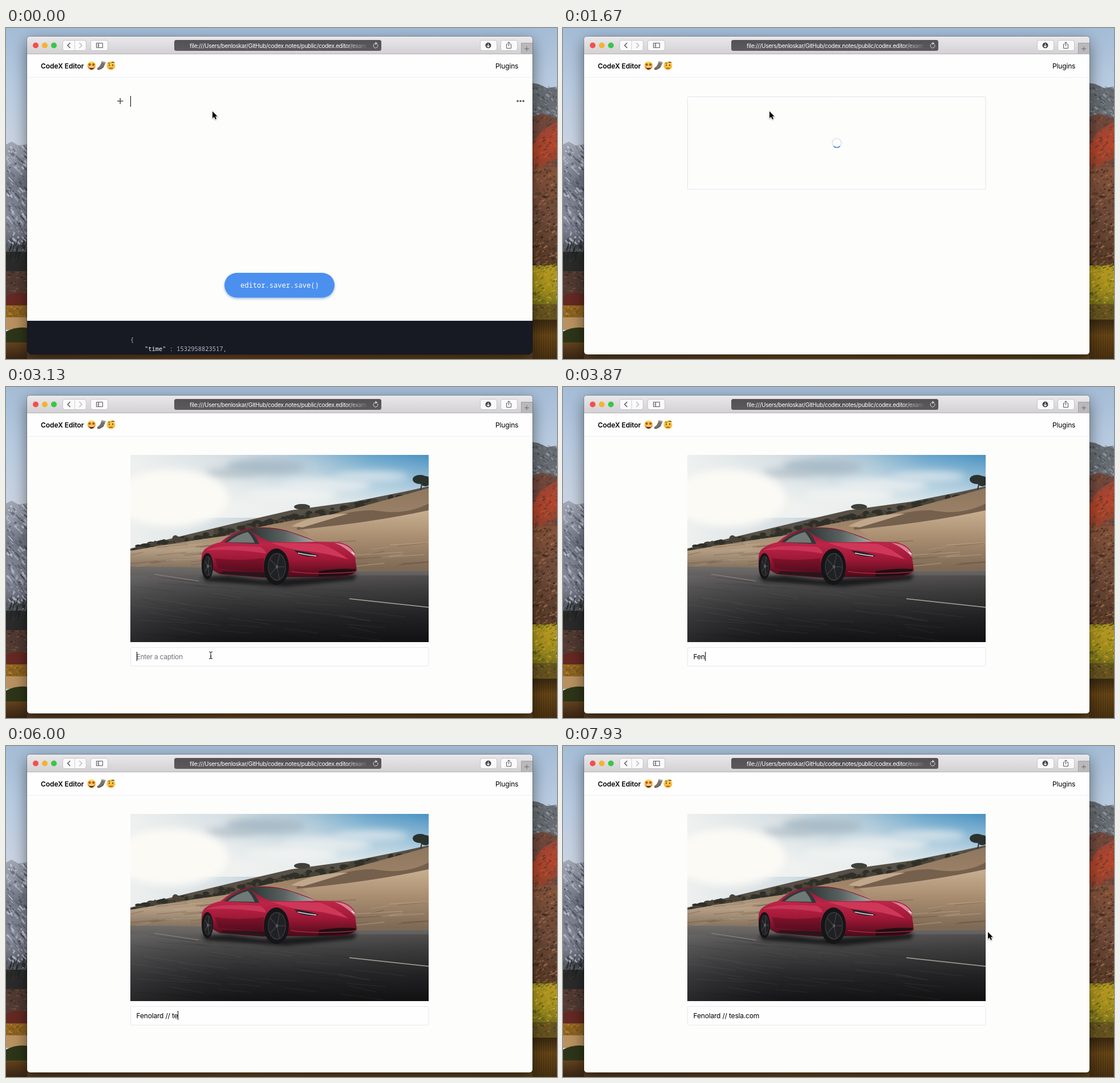
An HTML page with a canvas for the animation above (8 s loop, 966x580 px).

```html
<!DOCTYPE html>
<html lang="en">
<head>
<meta charset="utf-8">
<title>Block editor</title>
<style>
html, body { margin: 0; width: 100%; height: 100%; overflow: hidden; background: #a9bfd6; }
canvas { display: block; width: 966px; height: 580px; }
</style>
</head>
<body>
<canvas id="stage" width="966" height="580"></canvas>
<script>
const W = 966, H = 580, LOOP = 8000, STEP = 200 / 3;
const SANS = 'Inter, sans-serif', MONO = '"Noto Sans Mono", monospace';
const PASTE = 766, SPIN = 1200, LOADED = 1866, FOCUS = 2730, BLUR = 7860;
const CAPTION = 'Fenolard // tesla.com';
const TYPE_FROM = 3300, KEY_GAP = 187;
const keyTime = n => TYPE_FROM + n * KEY_GAP;

const screen = document.getElementById('stage').getContext('2d');
let c = screen;
let seed = 7;
const rand = () => (seed = (seed * 16807) % 2147483647) / 2147483647;

function layer(draw) {
  const cv = document.createElement('canvas');
  cv.width = W; cv.height = H;
  c = cv.getContext('2d');
  draw();
  c = screen;
  return cv;
}

function gradient(x0, y0, x1, y1, stops) {
  const g = c.createLinearGradient(x0, y0, x1, y1);
  stops.forEach(([p, col]) => g.addColorStop(p, col));
  return g;
}

function box(x, y, w, h, fill) { c.fillStyle = fill; c.fillRect(x, y, w, h); }

function round(x, y, w, h, r, fill, line) {
  c.beginPath(); c.roundRect(x, y, w, h, r);
  if (fill) { c.fillStyle = fill; c.fill(); }
  if (line) { c.strokeStyle = line; c.lineWidth = 1; c.stroke(); }
}

function oval(x, y, rx, ry, fill) {
  c.beginPath(); c.ellipse(x, y, rx, ry, 0, 0, 7);
  c.fillStyle = fill; c.fill();
}

function shape(d, fill) { c.fillStyle = fill; c.fill(new Path2D(d)); }

function line(d, col, w = 1) {
  c.strokeStyle = col; c.lineWidth = w;
  c.stroke(new Path2D(d));
}

function text(s, x, y, font, col, gap = 0) {
  c.font = font; c.letterSpacing = gap + 'px'; c.fillStyle = col;
  c.fillText(s, x, y);
  return c.measureText(s).width;
}

// Slanted flecks give rock, scrub and foliage their grain.
function speckle(x, y, w, h, n, cols, size = 4, slant = 0) {
  for (let i = 0; i < n; i++) {
    c.globalAlpha = 0.35 + rand() * 0.5;
    const px = x + rand() * w, py = y + rand() * h, len = 1 + rand() * size;
    line(`M${px} ${py} l${len} ${len * slant}`, cols[Math.floor(rand() * cols.length)], 1 + rand() * size * 0.4);
  }
  c.globalAlpha = 1;
}

function wallpaper() {
  box(0, 0, W, H, gradient(0, 0, 0, 210, [[0, '#a4bcd6'], [0.5, '#b9cce1'], [1, '#cbd4e2']]));

  // left side
  shape('M0 204 L10 199 L22 206 L40 203 V400 H0Z',
    gradient(0, 200, 0, 400, [[0, '#a2a8b6'], [0.35, '#777c8b'], [0.7, '#858999'], [1, '#4c5059']]));
  speckle(0, 206, 38, 180, 230, ['#d9dce6', '#3f424d', '#666a78', '#b5b9c8'], 7, 1.1);
  box(0, 392, 40, 36, '#292a29');
  speckle(0, 382, 38, 30, 50, ['#202322', '#373938'], 4, -3);
  box(0, 426, 40, 44, '#503a32');
  speckle(0, 428, 38, 40, 50, ['#745344', '#332722'], 6);
  shape('M0 470 Q14 460 40 466 V490 H0Z', '#642922');
  box(0, 486, 40, 22, '#8f6422');
  speckle(0, 487, 38, 18, 50, ['#c38b22', '#5d4a1e', '#a96c25']);
  box(0, 507, 40, 22, '#b99260');
  shape('M0 532 Q20 522 40 526 V553 H0Z', '#2d3518');
  box(0, 551, 40, 30, gradient(0, 551, 0, 580, [[0, '#62431e'], [1, '#392313']]));

  // right side
  shape('M920 96 L933 98 L948 105 L966 103 V180 H920Z', '#666c72');
  speckle(922, 102, 44, 52, 90, ['#a9aeb3', '#40464a', '#80868a'], 5, 0.8);
  shape('M920 156 L940 150 L966 158 V262 H920Z', '#71493d');
  shape('M920 206 L940 180 L966 164 V228 L920 256Z',
    gradient(920, 170, 950, 250, [[0, '#94463a'], [0.5, '#b4452b'], [1, '#8a4430']]));
  speckle(922, 158, 44, 88, 130, ['#c4512e', '#643a30', '#87503a', '#493833'], 5, -0.7);
  box(920, 244, 46, 176, gradient(0, 244, 0, 420, [[0, '#855239'], [0.5, '#6d4938'], [1, '#553824']]));
  speckle(922, 246, 44, 170, 280, ['#36251d', '#a4714f', '#58402f'], 6, -0.5);
  box(920, 416, 46, 74, gradient(0, 416, 0, 490, [[0, '#b39a23'], [0.5, '#a8921c'], [1, '#6e6b1c']]));
  speckle(922, 414, 44, 72, 130, ['#d9c128', '#746e18', '#4d5519', '#c1912b'], 6, -0.6);
  box(920, 484, 46, 28, '#66531f');
  speckle(922, 486, 44, 24, 50, ['#363c18', '#9c7330', '#45451b']);
  box(920, 511, 46, 69, gradient(0, 511, 0, 580, [[0, '#382910'], [0.4, '#694716'], [1, '#493110']]));
  for (let x = 922; x < 966; x += 4) box(x, 514, 1.5, 66, 'rgba(25,18,8,.25)');

  box(37, 571, 886, 9, gradient(37, 0, 923, 0, [[0, '#593d21'], [0.4, '#6a4720'], [1, '#5d431a']]));
}

function emojis() {
  const face = x => oval(x, 66, 7.5, 7.5, gradient(0, 58, 0, 74, [[0, '#ffdc55'], [1, '#f3a72e']]));
  const star = x => {
    c.beginPath();
    for (let i = 0; i < 10; i++) {
      const a = i * Math.PI / 5 - Math.PI / 2, r = i % 2 ? 1.4 : 3.3;
      c.lineTo(x + Math.cos(a) * r, 64 + Math.sin(a) * r);
    }
    c.fillStyle = '#a84b2b'; c.fill();
  };
  face(150); star(146.7); star(153.3);
  shape('M145 68 H155 Q154 73 150 73 Q146 73 145 68Z', '#6b351c');
  box(146, 68, 8, 1.5, '#fff');
  shape('M168 58 L175 60 L171 69 Q166 74 160 73 Q159 70 163 68 Q166 65 168 58Z', '#77736c');
  shape('M168 58 L175 60 L174 62 L167 60Z', '#aaa69b');
  line('M161 73 Q168 72 171 67', '#4e4b47');
  face(184);
  oval(181, 65, 1, 1.6, '#654019'); oval(187, 65, 1, 1.6, '#654019');
  line('M178.5 61.5 H183 M185 61 Q187.5 58.5 190 61 M181 70.5 H187', '#654019', 1.2);
}

function browser() {
  c.save();
  c.shadowColor = 'rgba(0,0,0,.5)'; c.shadowBlur = 28; c.shadowOffsetY = 9;
  round(37, 15, 886, 557, 5, '#fdfdfc');
  c.restore();
  round(36.5, 14.5, 887, 558, 5, null, 'rgba(0,0,0,.2)');

  round(37, 15, 886, 31, [5, 5, 0, 0], gradient(0, 15, 0, 46, [[0, '#eae8ea'], [1, '#d2d0d2']]));
  box(37, 45, 886, 1, '#b5b3b6');
  [['#f2504c', 52], ['#f3b332', 68], ['#38c748', 84]].forEach(([col, x]) => oval(x, 30.5, 5, 5, col));

  const button = (x, w) => round(x + 0.5, 21.5, w, 18, 3.5, '#fbfafb', '#c6c4c7');
  button(99, 41); button(148, 30); button(831, 29); button(867, 29);
  box(120, 22, 1, 18, '#d0ced1');
  line('M112.5 26 L108 30.5 L112.5 35', '#505053', 1.4);
  line('M128.5 26 L133 30.5 L128.5 35', '#b9b8bb', 1.4);
  line('M158.5 26.5 H169.5 V34.5 H158.5Z M162.5 26.5 V34.5 M160 29 H161.5 M160 31.5 H161.5', '#57565a');
  oval(845.5, 30.5, 5, 5, '#434246');
  line('M845.5 27.5 V33 M843 31 L845.5 33.5 L848 31', '#fff', 1.2);
  line('M879.5 28.5 H877.5 V35.5 H885.5 V28.5 H883.5 M881.5 32 V25 M879 27 L881.5 24.5 L884 27', '#57565a');
  box(903, 26, 20, 19, '#bab8bb');
  box(903, 26, 1, 19, '#a19fa2'); box(903, 26, 20, 1, '#a19fa2');
  line('M909 36.5 H917 M913 32.5 V40.5', '#68676a');

  round(295, 21, 363, 19, 3.5, gradient(0, 21, 0, 40, [[0, '#545155'], [1, '#5c595d']]));
  text('file:///Users/benloskar/GitHub/codex.notes/public/codex.editor/exam', 322, 34.5,
    '10px ' + SANS, gradient(322, 0, 632, 0, [[0, '#fff'], [0.88, '#fff'], [1, 'rgba(255,255,255,.15)']]), -0.26);
  c.beginPath(); c.arc(648, 31, 4, -0.6, 4.7);
  c.strokeStyle = '#d6d4d7'; c.lineWidth = 1; c.stroke();
  shape('M647.5 24.5 L651.5 27 L647.5 29.5Z', '#d6d4d7');

  box(37, 46, 886, 40, '#fefefe');
  box(37, 86, 886, 1, '#edeef6');
  text('CodeX Editor', 61, 71, '600 12px ' + SANS, '#000', -0.05);
  text('Plugins', 858, 71, '12px ' + SANS, '#000', -0.15);
  emojis();
}

function emptyPage() {
  line('M195 128 H205.5 M200.25 122.75 V133.25', '#55565a', 1.7);
  [897, 902, 907].forEach(x => oval(x, 128, 1.8, 1.8, '#55565a'));
  c.save();
  c.shadowColor = 'rgba(45,100,180,.4)'; c.shadowBlur = 4; c.shadowOffsetY = 2;
  round(383, 429, 193, 43.5, 21.75, '#4b90ef');
  c.restore();
  text('editor.saver.save()', 411, 454.5, '12.1px ' + MONO, '#fff');
  round(37, 513, 886, 59, [0, 0, 5, 5], '#171923');
  text('{', 218, 550, '10.43px ' + MONO, '#b7bbc9');
  const w = text('"time"', 243, 566, '10.43px ' + MONO, '#f2f3f7');
  text(' : 1532958823517,', 243 + w, 566, '10.43px ' + MONO, '#b7bbc9');
}

function scenery() {
  box(218, 119, 523, 210, gradient(218, 0, 741, 0,
    [[0, '#eef0ef'], [0.35, '#d3dde2'], [0.6, '#a6c4d6'], [0.8, '#68a5cb'], [1, '#4a92c2']]));
  box(218, 119, 523, 110, gradient(0, 119, 0, 205, [[0, 'rgba(244,245,242,0)'], [1, 'rgba(244,245,242,.85)']]));
  c.filter = 'blur(7px)';
  [[455, 140, 70, 14, '#a9bcc8'], [395, 150, 45, 7, '#b4c1c9'], [560, 172, 80, 12, '#e4ebee'],
    [640, 157, 65, 9, '#d3e1e8'], [290, 195, 100, 50, '#fbfaf5'], [500, 190, 80, 13, '#eef1f0']]
    .forEach(a => oval(...a));
  c.filter = 'none';

  shape('M218 283 L300 263 L400 239 L500 216 L610 201 L700 183 L741 174 V330 H218Z', '#575046');
  for (let i = 0; i < 170; i++) {
    const u = rand();
    oval(225 + u * 485, 279 - u * 92 + rand() * 10, 3 + rand() * 6, 2 + rand() * 4,
      rand() < 0.6 ? '#2f3029' : '#494338');
  }
  oval(726, 162, 13, 8, '#2b322d'); oval(735, 165, 10, 9, '#2b322d');
  line('M730 165 L727 180', '#303731', 2);
  oval(519, 210, 14, 5, '#3f4139');

  shape('M218 287 Q310 271 390 260 Q470 236 560 226 Q660 200 741 177 V326 H218Z',
    gradient(0, 180, 0, 322, [[0, '#8f7860'], [0.45, '#a08468'], [0.75, '#b39d83'], [1, '#7d6a57']]));
  shape('M520 250 Q620 236 741 215 V320 H600Z',
    gradient(0, 218, 0, 322, [[0, '#c7ae8f'], [0.45, '#a98d70'], [1, '#7b6754']]));
  shape('M510 246 Q600 214 645 216 Q700 226 741 204 V216 Q640 238 510 250Z', '#74604d');
  shape('M500 244 Q540 222 600 222 Q560 234 520 246Z', '#c1a88c');
  c.globalAlpha = 0.28;
  for (let i = 0; i < 70; i++) {
    const x = 218 + rand() * 480, y = 274 + rand() * 42;
    line(`M${x} ${y} l${20 + rand() * 70} -5`, rand() < 0.5 ? '#d8bfa2' : '#594838', 1 + rand());
  }
  c.globalAlpha = 1;

  shape('M218 315 Q340 314 470 322 Q610 324 741 322 V447 H218Z',
    gradient(0, 315, 0, 447, [[0, '#6f6c69'], [0.3, '#4a494a'], [0.65, '#29292b'], [1, '#141416']]));
  box(218, 330, 523, 117, gradient(218, 0, 741, 0,
    [[0, 'rgba(140,140,140,.16)'], [0.4, 'rgba(0,0,0,.06)'], [1, 'rgba(0,0,0,.18)']]));
  c.globalAlpha = 0.1;
  for (let i = 0; i < 60; i++) {
    const x = 218 + rand() * 420, y = 325 + rand() * 110;
    line(`M${x} ${y} l${40 + rand() * 60} ${4 + rand() * 8}`, rand() < 0.5 ? '#aaa' : '#000');
  }
  c.globalAlpha = 1;
  line('M260 328 L338 340', '#8c8a85', 1.2);
  line('M602 371 L741 386', '#aaa598', 1.7);
}

function car() {
  c.filter = 'blur(3px)';
  shape('M342 333 L390 330 L450 338 L615 328 L610 338 L490 350 L352 341Z', 'rgba(10,10,12,.75)');
  c.filter = 'none';
  shape('M343 310 Q341 289 350 283 Q363 274 376 272 Q395 255 423 248 Q465 242 500 254 Q528 263 544 271 ' +
    'L584 272 Q604 276 611 290 L615 321 Q611 330 585 333 L500 333 L450 334 L375 328Z',
    gradient(0, 247, 0, 335, [[0, '#7d1c30'], [0.32, '#bb2547'], [0.62, '#a01837'], [1, '#430b17']]));
  shape('M382 272 Q399 257 426 250 Q438 260 444 275Z', '#30383a');
  shape('M389 272 Q404 259 424 254 Q432 263 436 273Z', '#6f7976');
  shape('M426 249 Q465 244 500 255 L543 271 Q502 273 463 271 Q442 263 426 249Z',
    gradient(430, 0, 543, 0, [[0, '#2d3736'], [0.5, '#58615f'], [1, '#a9b0ac']]));
  shape('M465 273 Q515 273 552 275 Q578 284 600 302 Q555 289 512 286 Q490 282 465 273Z', '#cf3759');
  shape('M576 273 Q600 275 610 290 L612 298 Q596 281 576 273Z', '#d68396');
  shape('M351 286 Q371 275 445 280 Q454 284 456 292 Q405 283 351 286Z', '#c93457');
  shape('M366 300 Q410 306 452 300 L450 324 Q410 322 372 318Z', 'rgba(70,8,25,.4)');
  shape('M379 323 Q418 324 454 325 L455 333 L378 327Z', '#2a151b');
  shape('M505 286 Q532 289 549 296 Q530 299 515 294Z', '#252329');
  line('M512 291 Q530 295 544 296', '#e8dfe2', 1.5);
  line('M606 289 L611 293', '#efe4e5', 2);
  shape('M548 323 Q580 317 613 319 Q612 328 592 330 L548 332Z', '#1e0f13');
  line('M500 323 Q540 330 614 324', '#a92440', 1.4);
  [[353, 314, 10, 23], [474, 315, 22, 32]].forEach(([x, y, rx, ry]) => {
    oval(x, y, rx, ry, '#141517');
    oval(x + 1, y, rx * 0.72, ry * 0.76, '#3a3939');
    oval(x + 1, y, rx * 0.66, ry * 0.7, '#202124');
    for (let i = 0; i < 5; i++) {
      const a = i * 1.257;
      line(`M${x + 1} ${y} L${x + 1 + Math.cos(a) * rx * 0.65} ${y + Math.sin(a) * ry * 0.7}`, '#424245', 1.2);
    }
    oval(x + 1, y, 2, 3, '#5c5a5e');
  });
}

function photoPage() {
  c.save();
  c.beginPath(); c.rect(218, 119, 523, 328); c.clip();
  scenery(); car();
  c.restore();
  round(218.5, 456.5, 522.5, 32.5, 2, '#fefefe', '#e6e8f1');
}

const base = layer(() => { wallpaper(); browser(); });
const empty = layer(emptyPage);
const photo = layer(photoPage);

// The blue quarter starts on the left when the block is pasted.
function loader(t) {
  round(218.5, 120.5, 522.5, 162, 1, null, '#e2e4ef');
  const a = Math.PI * (1 + 2 * (t - PASTE) / SPIN);
  c.lineWidth = 1.7;
  c.beginPath(); c.arc(480, 201.5, 8, 0, 7); c.strokeStyle = '#e0e3ec'; c.stroke();
  c.beginPath(); c.arc(480, 201.5, 8, a - Math.PI / 4, a + Math.PI / 4); c.strokeStyle = '#4389df'; c.stroke();
}

const blink = (t, since) => (t - since) % 1000 < 500;

function caption(t) {
  const count = Math.min(CAPTION.length, Math.max(0, Math.floor((t - TYPE_FROM) / KEY_GAP)));
  const font = '12px ' + SANS;
  const w = count ? text(CAPTION.slice(0, count), 228.5, 477, font, '#000', -0.18) : 0;
  if (!count) text('Enter a caption', 228.5, 477, font, '#707378', -0.26);
  const since = count ? keyTime(count) : FOCUS;
  if (t >= FOCUS && t < BLUR && blink(t, since)) box(Math.round(228.5 + w), 464, 1, 16, '#000');
}

function glide(t, start, end, from, to) {
  const p = Math.min(1, Math.max(0, (t - start) / (end - start)));
  const e = p * p * (3 - 2 * p);
  return from.map((v, i) => v + (to[i] - v) * e);
}

function pointer(t) {
  const shown = keyTime(CAPTION.length) + 100;
  if (t >= keyTime(1) && t < shown) return;
  const rest = [362, 146], field = [359, 470];
  const [x, y] = t < shown ? glide(t, 2130, 2575, rest, field) : glide(t, shown, 7800, field, [745, 326]);
  c.save();
  c.translate(x, y);
  if (t >= LOADED && y > 456 && y < 489 && x < 741) {
    line('M-3 -6 Q0 -6 0 -4 Q0 -6 3 -6 M0 -4 V4 M-3 6 Q0 6 0 4 Q0 6 3 6 M-1.5 1.5 H1.5', '#222', 1.1);
  } else {
    const arrow = 'M0 0 V12 L2.8 9.4 L5 14 L7 13 L4.9 8.7 H8.6Z';
    c.shadowColor = 'rgba(0,0,0,.35)'; c.shadowBlur = 2; c.shadowOffsetY = 1;
    line(arrow, '#fff', 1.6);
    c.shadowColor = 'transparent';
    shape(arrow, '#000');
  }
  c.restore();
}

function frame(now) {
  const t = Math.floor(((now % LOOP) + 4) / STEP) * STEP;
  c.drawImage(base, 0, 0);
  if (t < PASTE) {
    c.drawImage(empty, 0, 0);
    if (blink(t, 0)) box(218, 119, 1, 19, '#000');
  } else if (t < LOADED) {
    loader(t);
  } else {
    c.drawImage(photo, 0, 0);
    caption(t);
  }
  pointer(t);
}

const start = performance.now();
function tick() {
  frame(performance.now() - start);
  requestAnimationFrame(tick);
}
tick();
</script>
</body>
</html>
```
